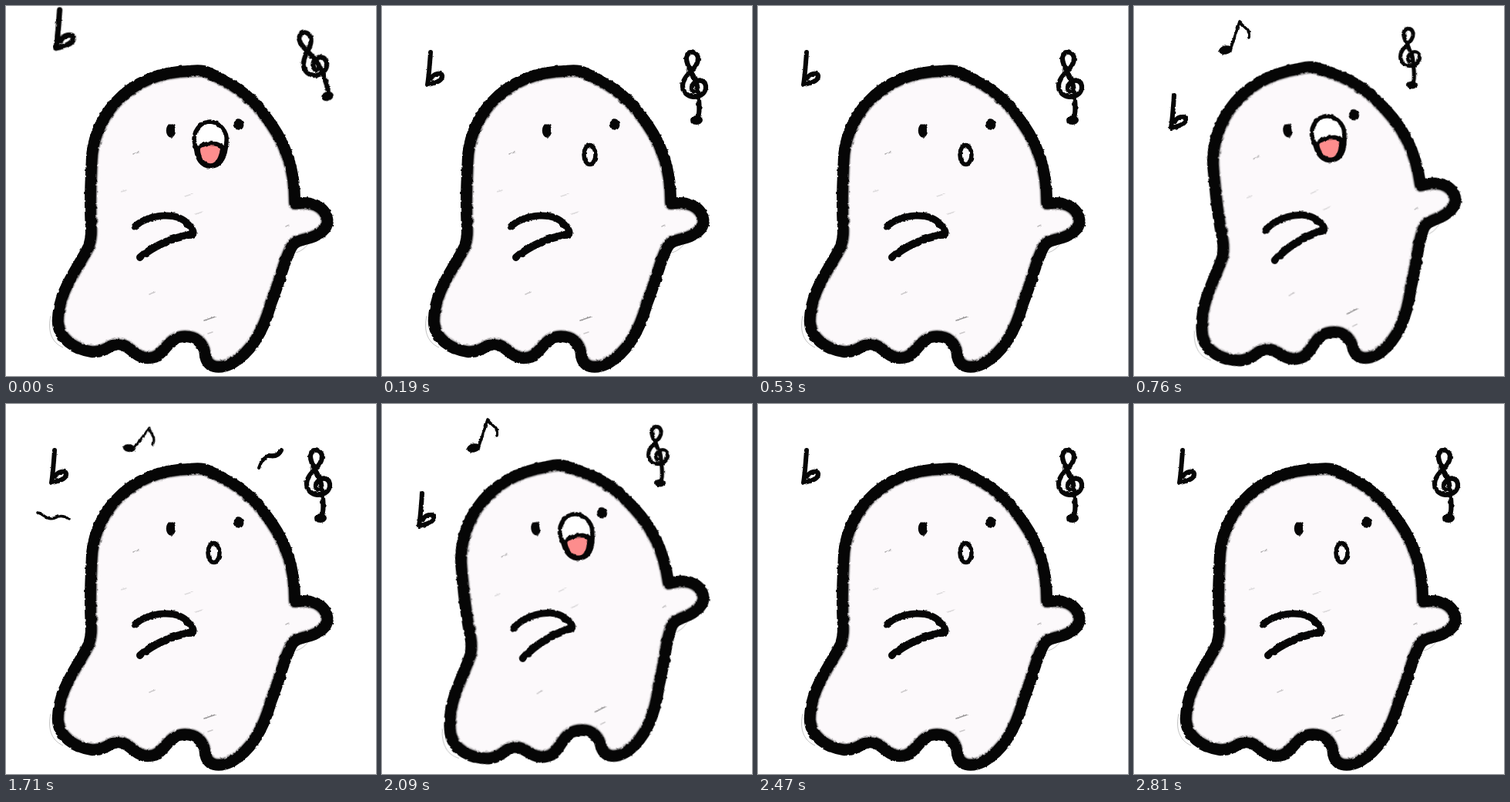
Write an HTML page that moves like this. It is 480 px wide and 480 px high and loops after 3040 ms.

```html
<!DOCTYPE html>
<html lang="en">
<head>
<meta charset="utf-8">
<title>Singing ghost</title>
<style>
  html, body { margin: 0; width: 100%; height: 100%; overflow: hidden; background: #fff; }
  svg { display: block; width: 100vw; height: 100vh; }
  .ink { fill: none; stroke: #060606; stroke-linecap: round; stroke-linejoin: round; }
  .solid { fill: #060606; }
  .paper { fill: #fcf9fb; }
  .smudge { fill: none; stroke: #bbb; stroke-width: .9; }
</style>
</head>
<body>
<svg viewBox="0 0 480 480">
  <defs>
    <filter id="rough" filterUnits="userSpaceOnUse" x="-20" y="-20" width="520" height="520" color-interpolation-filters="sRGB">
      <feTurbulence type="fractalNoise" baseFrequency=".17" numOctaves="2" seed="4"/>
      <feDisplacementMap in="SourceGraphic" scale="3" xChannelSelector="R" yChannelSelector="G"/>
    </filter>
    <filter id="soft" filterUnits="userSpaceOnUse" x="0" y="0" width="480" height="480">
      <feGaussianBlur stdDeviation="1"/>
    </filter>
    <path id="outline" d="M111 200 C112 153 149 86 240 84 C248 83 256 83 262 86
      C291 99 315 114 333 138 C363 175 375 210 375 256
      C390 254 406 256 414 268 C422 282 415 292 400 299 C385 305 374 303 369 316
      C361 331 356 356 344 386 C335 419 319 449 293 464
      C276 472 260 470 258 452 C256 437 247 429 232 429
      C208 429 206 458 184 457 C166 456 160 439 146 439
      C133 439 132 449 112 449 C90 446 67 432 67 408
      C68 370 90 345 106 314 C112 300 110 292 110 285 C108 250 110 225 111 200 Z"/>
    <clipPath id="inside"><use href="#outline"/></clipPath>
  </defs>

  <g id="ghost">
    <path class="smudge" d="M58 402 C54 420 58 436 74 443 M376 320 C384 318 390 312 393 307"/>
    <g filter="url(#rough)">
      <use href="#outline" class="paper"/>
      <g id="specks" class="ink" clip-path="url(#inside)"></g>
      <g clip-path="url(#inside)">
        <use href="#outline" class="ink" stroke-width="16" filter="url(#soft)"/>
      </g>
      <use href="#outline" class="ink" stroke-width="14.5"/>
      <path class="ink" stroke-width="9" d="M167 286 C185 270 222 266 236 283 C243 290 246 296 240 297"/>
      <path class="ink" stroke-width="10" d="M242 296 C215 301 192 311 174 326"/>
      <ellipse class="solid" cx="214" cy="161.500" rx="6.200" ry="9.200"/>
      <ellipse class="solid" cx="302" cy="153.500" rx="6.300" ry="7.400" transform="rotate(-15 302 153.500)"/>
      <g id="open" class="ink" stroke-width="5.500">
        <path fill="#fff" d="M244 172 C245 158 255 150 265 150 C277 151 288 163 286 176 C285 195 279 208 265 208 C253 208 248 197 247 188 C246 182 244 177 244 172 Z"/>
        <path fill="#fd8d8d" d="M249 186 C253 177 273 176 281 183 C279 199 274 207 265 207 C256 207 250 198 249 186 Z"/>
      </g>
      <ellipse id="closed" class="ink" stroke-width="5.500" cx="269.500" cy="193" rx="7.500" ry="12.500"/>
    </g>
  </g>

  <g filter="url(#rough)">
    <g id="treble">
      <g transform="translate(-405 -104)">
        <path class="ink" stroke-width="6.200" d="M408 147 C414 143 411 120 409 104 C406 90 394 78 395 67
          C397 57 408 58 410 67 C411 82 390 88 390 104 C391 121 416 123 420 107
          C421 97 412 94 406 99 C401 103 401 108 404 111"/>
        <ellipse class="solid" cx="408" cy="148" rx="8" ry="6"/>
      </g>
    </g>
    <g id="flat">
      <path class="ink" stroke-width="6" d="M-5 -22 C-6 -8 -7 8 -9 20 C2 18 11 14 10 8 C9 4 -1 5 -4 12"/>
    </g>
    <g id="note">
      <path class="ink" stroke-width="3.500" d="M-11 34 L0 0 C3 7 15 10 12 21"/>
      <ellipse class="solid" cx="-18" cy="37" rx="9" ry="5.500" transform="rotate(-12 -18 37)"/>
    </g>
    <g id="waves" class="ink">
      <path stroke-width="3.500" d="M41 141 C50 143 52 151 62 148 C70 144 76 145 81 149"/>
      <path stroke-width="4" d="M328 83 C332 72 335 69 341 67"/>
      <path stroke-width="6" d="M341 67 C347 68 354 67 357 60"/>
    </g>
  </g>
</svg>
<script>
  const LOOP = 3040;
  const STARTS = [0, 190, 760, 1140, 2090, 2470];
  const $ = id => document.getElementById(id);

  // Holds each value until the next start time.
  function hold(id, property, values) {
    const frames = values.map((value, i) => ({
      offset: STARTS[i] / LOOP, easing: 'step-end', [property]: value
    }));
    frames.push({ offset: 1, [property]: values[values.length - 1] });
    $(id).animate(frames, { duration: LOOP, iterations: Infinity });
  }
  const show = (id, pattern) =>
    hold(id, 'visibility', [...pattern].map(c => c === '1' ? 'visible' : 'hidden'));
  const place = (x, y, angle = 0, scale = 1) =>
    `translate(${x}px, ${y}px) rotate(${angle}deg) scale(${scale})`;
  const pose = (id, first, rest, swung) =>
    hold(id, 'transform', [first, rest, swung, rest, swung, rest]);

  // Faint pencil crumbs: x, y, length, opacity
  const crumbs = [
    [165, 192, 7, .3], [257, 408, 14, .4], [186, 374, 8, .2], [246, 270, 9, .13],
    [232, 247, 10, .12], [362, 286, 5, .25], [262, 425, 6, .2], [150, 241, 6, .12]
  ];
  $('specks').innerHTML = crumbs.map(([x, y, length, opacity]) =>
    `<path stroke-width="1.5" opacity="${opacity}" d="M${x} ${y} l${length} ${-length / 3}"/>`).join('');

  const upright = place(0, 0);
  pose('ghost', upright, upright, place(-34.9, 31.2, -8));
  pose('treble', place(401, 76, -17.4), place(405, 104), place(358, 66, 0, .83));
  pose('flat', place(75.5, 31, 0, 1.18), place(68, 82), place(57, 138));
  pose('note', place(137, 20), place(186, 31, 19, .9), place(137, 20));
  show('open', '101010');
  show('closed', '010101');
  show('note', '001110');
  show('waves', '000100');
</script>
</body>
</html>
```
